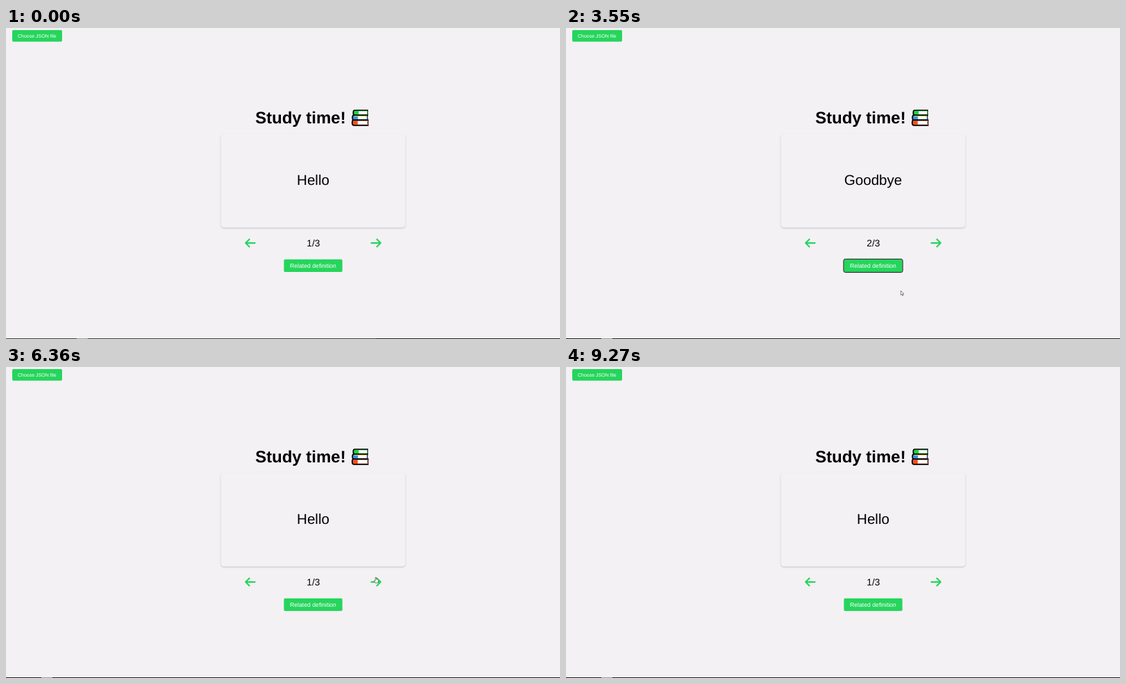
Animation of 800x450 px, one loop 9300 ms. Source, as an HTML page:

```html
<!DOCTYPE html>
<html lang="en">
<head>
<meta charset="utf-8">
<title>Study time</title>
<style>
  html, body { margin: 0; width: 100%; height: 100%; overflow: hidden; background: #f3f1f4; }
  svg { display: block; width: 100vw; height: 100vh; }
  text { font-family: "Liberation Sans", Arial, sans-serif; text-rendering: geometricPrecision; }
  .mid { text-anchor: middle; }
  .label { fill: #fff; }
  .arrow { fill: none; stroke: #25d55c; stroke-width: 2.1; stroke-linecap: round; stroke-linejoin: round; }
</style>
</head>
<body>
<svg viewBox="0 0 800 450">
  <defs>
    <linearGradient id="backFill" x2="0" y2="1">
      <stop offset="0" stop-color="#f1eff2"/>
      <stop offset="0.3" stop-color="#eeecef"/>
      <stop offset="1" stop-color="#edecef"/>
    </linearGradient>
    <filter id="shadow" x="-10%" y="-10%" width="120%" height="125%">
      <feDropShadow dx="0" dy="1" stdDeviation="1.2" flood-color="#000" flood-opacity="0.24"/>
    </filter>
  </defs>
  <rect width="800" height="450" fill="#f3f1f4"/>

  <rect x="9" y="3" width="72" height="16.7" rx="1.8" fill="#25d55c"/>
  <text class="mid label" x="44.8" y="13.9" font-size="7">Choose JSON file</text>

  <g id="page">
    <text x="360" y="137.7" font-size="24" font-weight="bold">Study time!</text>
    <g id="books" stroke="#000" stroke-width="1.7" stroke-linejoin="round"></g>

    <g id="card">
      <rect id="face" x="310.5" y="152.7" width="266" height="135.8" rx="4.5" filter="url(#shadow)"/>
      <text id="word" class="mid" x="443.5" y="227.4" font-size="20.6"></text>
    </g>

    <path class="arrow" d="M351.4 305.7L346 311.1L351.4 316.5M346.3 311.1H359.5"/>
    <path class="arrow" d="M535.6 305.7L541 311.1L535.6 316.5M540.7 311.1H527.5"/>
    <text id="counter" class="mid" x="443.8" y="315.9" font-size="13.7"></text>

    <rect id="button" x="401.3" y="334.7" width="84.4" height="18.4" rx="1.8"/>
    <rect id="focus" x="400.9" y="334.3" width="85.3" height="19.3" rx="2.5" fill="none" stroke="#101010"/>
    <text class="mid label" x="443.5" y="347" font-size="8.67">Related definition</text>
    <text id="definition" class="mid" x="443.4" y="363.7" font-size="6.89" fill="#333"></text>
  </g>

  <rect y="449" width="800" height="1" fill="#1c1c1e"/>
  <rect id="barFill" y="449" width="535" height="1" fill="#3b3b3d"/>
  <rect id="barTab" y="449" width="16" height="1" fill="#9a9a9c"/>

  <g id="cursor" fill="#fff" stroke="#333" stroke-width="0.6" stroke-linejoin="round">
    <path id="pointer" d="M0 0V6.3L1.4 5.1L2.4 7.3L3.4 6.9L2.4 4.7H4.3Z"/>
    <path id="hand" d="M-0.7 0.6Q0 -0.4 0.7 0.6V3L3.2 3.6Q3.9 4 3.7 5.2L2.9 8.4H-0.6L-2.4 5.6Q-2.6 4.7 -1.7 4.8L-0.7 5.6Z"/>
  </g>
</svg>
<script>
const LOOP = 9300, FLIP = 600, MIDDLE = 443.5;
const $ = id => document.getElementById(id);

const cards = [
  { front: "Hello", back: "Cześć", note: "\"Hello!\" or an equivalent greeting." },
  { front: "Goodbye", back: "Do widzenia", note: "" },
  { front: "Thank you", back: "Dziękuję",
    note: "An expression of gratitude or politeness in response to something done or given." }
];
const nextTimes = [1860, 3640, 6250];
const flipTimes = [2190, 2930, 4165, 4780, 7050, 7860];
const noteSpans = [[1060, 1860], [5370, 6250]];
const hoverSpans = [[720, 1200], [5130, 5880]];

// time, x, y of the pointer tip
const track = [
  [400, 452, 250], [850, 452, 343], [1060, 452, 343], [1290, 482.5, 385.5],
  [1700, 482.5, 385.5], [2100, 495, 392.7], [3200, 495, 392.7], [3700, 480.5, 376.7],
  [4770, 480.5, 376.7], [5200, 464.5, 342.8], [5700, 464.5, 342.8], [6150, 534, 304],
  [6450, 534, 304], [6900, 497.7, 253.5], [8700, 497.7, 253.5]
];

const clamp = v => Math.max(0, Math.min(1, v));
const smooth = v => v * v * (3 - 2 * v);
const inside = (t, spans) => spans.some(([a, b]) => t >= a && t < b);
const show = (id, on) => $(id).setAttribute("visibility", on ? "visible" : "hidden");

// CSS "ease": cubic-bezier(.25, .1, .25, 1)
function ease(x) {
  let lo = 0, hi = 1;
  const curve = (s, a, b) => 3 * s * (1 - s) ** 2 * a + 3 * s * s * (1 - s) * b + s ** 3;
  for (let i = 0; i < 20; i++) {
    const m = (lo + hi) / 2;
    if (curve(m, 0.25, 0.25) < x) lo = m; else hi = m;
  }
  return curve(lo, 0.1, 1);
}

function drawBooks() {
  const book = (x, y, w, h, color) => `
    <path d="M${x + w} ${y}H${x + 2}Q${x} ${y} ${x} ${y + h / 2}T${x + 2} ${y + h}H${x + w}" fill="${color}"/>
    <path d="M${x + w - 0.6} ${y + 1.4}H${x + 8}V${y + h - 1.2}H${x + w - 0.6}Z" fill="#fff" stroke="none"/>
    <path d="M${x + w - 0.6} ${y + 1}Q${x + w - 1.6} ${y + h / 2} ${x + w - 0.6} ${y + h - 1}" fill="none" stroke-width="1"/>`;
  $("books").innerHTML =
    book(499.9, 133.2, 23.6, 7.6, "#f4511e") +
    book(500.2, 126, 22.4, 7.2, "#2d9be8") +
    `<path d="M503 127.4H521" stroke="#f6c744" stroke-width="1.3"/>` +
    book(501.4, 119, 21.6, 7, "#27cf45");
}

function drawCursor(t) {
  const end = track.findIndex(k => k[0] > t);
  show("cursor", end > 0);
  if (end < 1) return;
  const a = track[end - 1], b = track[end];
  const p = smooth((t - a[0]) / (b[0] - a[0]));
  const x = a[1] + (b[1] - a[1]) * p, y = a[2] + (b[2] - a[2]) * p;
  $("cursor").setAttribute("transform", `translate(${x} ${y})`);
  const overCard = y < 289;
  const overButton = y > 329 && y < 353 && x > 401 && x < 486;
  const overArrow = y < 318 && x > 526;
  const hand = overCard || overButton || overArrow;
  $("hand").style.display = hand ? "" : "none";
  $("pointer").style.display = hand ? "none" : "";
}

function render(t) {
  const index = nextTimes.filter(n => t >= n).length % cards.length;
  const card = cards[index];
  const angle = flipTimes.reduce((sum, start) => sum + ease(clamp((t - start) / FLIP)), 0) * Math.PI;
  const turn = Math.cos(angle), isBack = turn < 0;
  const width = Math.max(Math.abs(turn), 0.001);
  $("card").setAttribute("transform", `translate(${MIDDLE} 0) scale(${width} 1) translate(${-MIDDLE} 0)`);
  $("face").setAttribute("fill", isBack ? "url(#backFill)" : "#f3f1f4");
  $("word").textContent = isBack ? card.back : card.front;
  $("counter").textContent = `${index + 1}/${cards.length}`;

  const noteOpen = inside(t, noteSpans);
  $("page").setAttribute("transform", `translate(0 ${noteOpen ? -6 : 0})`);
  $("definition").textContent = noteOpen ? card.note : "";

  const hover = Math.max(...hoverSpans.map(([a, b]) =>
    smooth(clamp((t - a) / 250)) * (1 - smooth(clamp((t - b) / 300)))));
  const mix = (from, to) => Math.round(from + (to - from) * hover);
  $("button").setAttribute("fill", `rgb(${mix(37, 48)},${mix(213, 170)},${mix(92, 91)})`);
  show("focus", t >= nextTimes[0] && t < nextTimes[2]);

  show("barFill", t < 1060);
  $("barTab").setAttribute("x", t < 1060 ? 102 : 51);
  drawCursor(t);
}

drawBooks();
const begin = performance.now();
function frame() {
  render((performance.now() - begin) % LOOP);
  requestAnimationFrame(frame);
}
frame();
</script>
</body>
</html>
```
